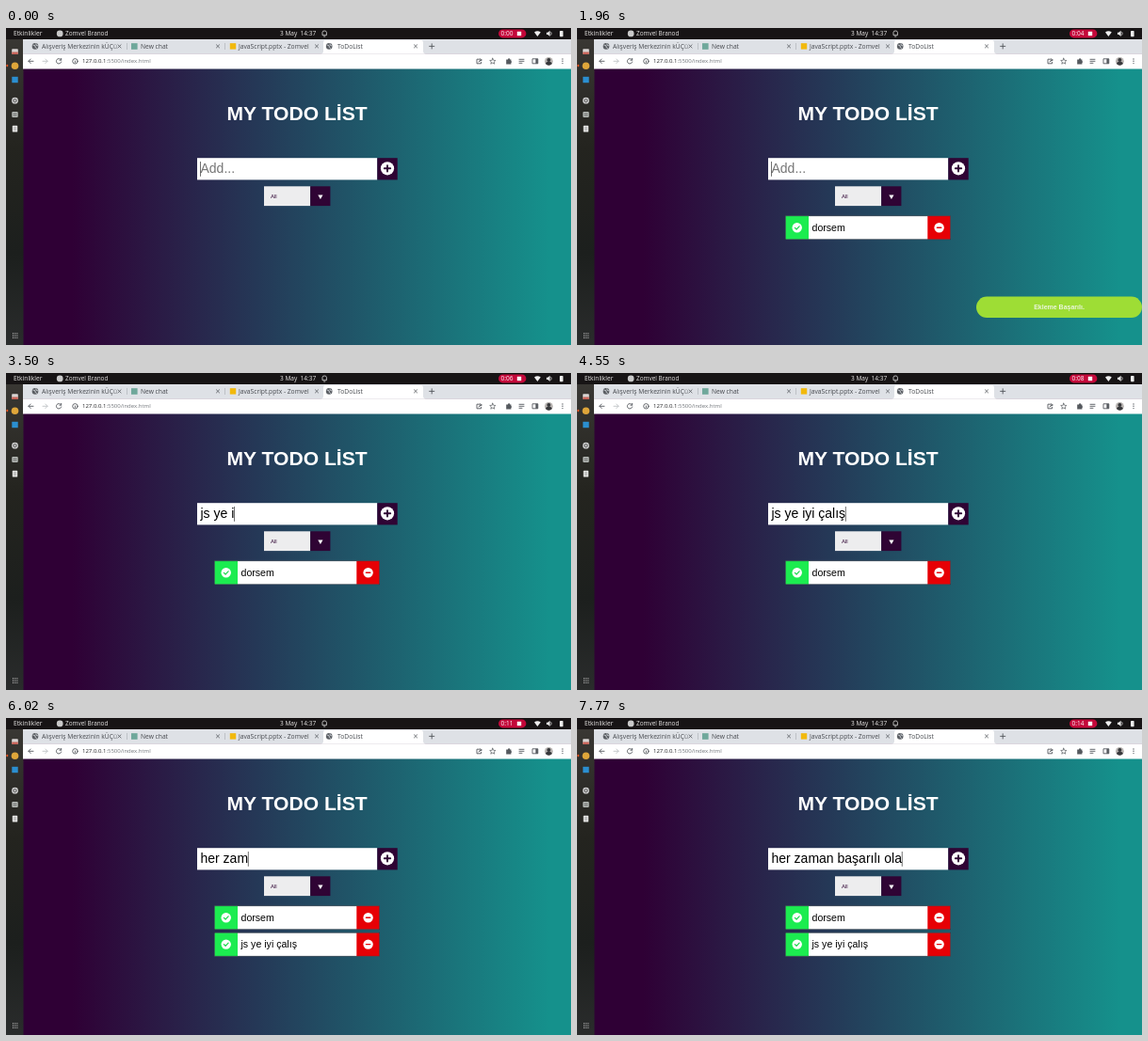
An HTML page that plays this animation: 600x337 px, repeating every 8 s.

```html
<!DOCTYPE html>
<html lang="tr">
<head>
<meta charset="utf-8">
<title>ToDoList</title>
<style>
  html, body { margin: 0; width: 100%; height: 100%; overflow: hidden; background: #2f0036; }
  svg { display: block; width: 100%; height: 100%; }
  text { white-space: pre; font-family: "Liberation Sans", Arial, sans-serif; }
  .ui text { font-family: "Open Sans", "Noto Sans", sans-serif; font-size: 6.7px; }
  .line { fill: none; stroke-linecap: round; stroke-linejoin: round; }
</style>
</head>
<body>
<svg viewBox="0 0 600 337" preserveAspectRatio="none">
  <defs>
    <linearGradient id="page">
      <stop offset=".09" stop-color="#2f0035"/>
      <stop offset=".96" stop-color="#15918c"/>
    </linearGradient>
    <linearGradient id="dockShade" x2="0" y2="1">
      <stop offset="0" stop-color="#393733"/>
      <stop offset=".35" stop-color="#24241f"/>
      <stop offset=".7" stop-color="#1c1f1d"/>
      <stop offset="1" stop-color="#2a2c2c"/>
    </linearGradient>
    <linearGradient id="tabFade" gradientUnits="userSpaceOnUse" x1="38" x2="126">
      <stop offset=".84" stop-color="#45484d"/>
      <stop offset="1" stop-color="#45484d" stop-opacity="0"/>
    </linearGradient>
    <g id="globe">
      <circle r="3.3" fill="#5a5e63"/>
      <path class="line" d="M-2.2-1.3 0-.6 0 1 1.4 2M.8-2.6 1.2-1 2.6-.6" stroke="#dee1e6" stroke-width=".8"/>
    </g>
    <path id="cross" class="line" d="M-1.6-1.6 1.6 1.6M1.6-1.6-1.6 1.6" stroke="#55595e" stroke-width=".8"/>
    <g id="row">
      <rect x="221.3" y="199.8" width="175.4" height="25" fill="#fff"/>
      <rect x="221.3" y="199.8" width="24.7" height="25" fill="#1cec50"/>
      <rect x="372.3" y="199.8" width="24.4" height="25" fill="#e60005"/>
      <rect x="221.3" y="199.8" width="175.4" height="25" fill="none" stroke="#26303c" stroke-width=".6"/>
      <g fill="#fff"><circle cx="233.7" cy="212.2" r="5.2"/><circle cx="384.6" cy="212.2" r="5.2"/></g>
      <path class="line" d="M231.4 212.3 233.1 214 236.1 210.8" stroke="#1cd84c" stroke-width="1.2"/>
      <path class="line" d="M382.4 212.2H386.8" stroke="#e60005" stroke-width="1.4"/>
    </g>
  </defs>

  <rect x="18" y="43" width="582" height="294" fill="url(#page)"/>

  <g class="ui">
    <rect y="12" width="18.5" height="325" fill="url(#dockShade)"/>
    <rect x="6.2" y="22.3" width="6.6" height="5.6" rx=".8" fill="#d8d4d2"/>
    <rect x="6.2" y="25.6" width="6.6" height="2.3" rx=".6" fill="#c8655a"/>
    <circle cx="9.5" cy="40.2" r="3.8" fill="#dfa63a"/>
    <rect x="6.3" y="51.8" width="6.4" height="6.4" fill="#2b8fd0"/>
    <circle cx="9.5" cy="77.2" r="3.4" fill="#cfcfcf"/>
    <circle cx="9.5" cy="77.2" r="1.6" fill="none" stroke="#444" stroke-width=".9"/>
    <rect x="6.3" y="89" width="6.4" height="6" rx="1" fill="#b9bdb9"/>
    <path d="M7.5 91H11.5M7.5 93H11.5" stroke="#444" stroke-width=".7"/>
    <rect x="6.8" y="103.8" width="5.4" height="6.8" rx=".6" fill="#e4e4e2"/>
    <path d="M8 106H11M8 108H11" stroke="#777" stroke-width=".6"/>
    <path d="M7 324.8H12.4M7 327H12.4M7 329.2H12.4" stroke="#d2d2d2" stroke-width="1.1" stroke-dasharray="1.1"/>
    <rect x=".4" y="38.8" width="1.8" height="2.4" rx=".8" fill="#e95420"/>

    <rect width="600" height="12" fill="#171415"/>
    <g fill="#e9e7e6">
      <text x="8" y="8.3">Etkinlikler</text>
      <circle cx="57.2" cy="5.9" r="3.4" fill="#c9c9c9"/>
      <text x="63" y="8.3" style="font-size:6.4px">Zomvel Branod</text>
      <text x="291" y="8.3" style="font-size:6.5px">3 May  14:37</text>
    </g>
    <path class="line" d="M336 7.3V4.6Q336 3 338.2 3T340.4 4.6V7.3ZM337.6 9H338.8" stroke="#ddd" stroke-width=".8"/>
    <rect x="523" y="1.4" width="29.4" height="9" rx="4.5" fill="#c4083a"/>
    <text id="clock" x="525.6" y="8.2" fill="#fff" style="font-size:6.5px">0:00</text>
    <rect x="542.8" y="3.8" width="4.4" height="4.4" fill="#fff"/>
    <g fill="#eee">
      <path d="M561 4.6Q564.4 1.9 567.8 4.6L564.4 9Z"/>
      <path d="M574 4.8H575.4L577.6 2.8V9L575.4 7H574Z"/>
      <rect x="588" y="3" width="3.6" height="6.3" rx=".7"/>
    </g>
    <path class="line" d="M578.8 4.4Q580 5.9 578.8 7.4" stroke="#eee" stroke-width=".7"/>

    <rect x="18" y="12" width="582" height="15.5" fill="#dee1e6"/>
    <path d="M334 27.5Q337 27.5 337 24.5V15.5Q337 13 339.5 13H440.5Q443 13 443 15.5V24.5Q443 27.5 446 27.5Z" fill="#fff"/>
    <path d="M128.5 16V23M232.5 16V23" stroke="#9da1a6" stroke-width=".5"/>
    <use href="#globe" x="31" y="19.4"/>
    <rect x="133" y="16.2" width="6.6" height="6.6" fill="#6fa89b"/>
    <rect x="237.8" y="16.2" width="6.4" height="6.4" fill="#f2b90c"/>
    <use href="#globe" x="343.2" y="19.4"/>
    <g fill="#45484d" style="font-size:6.8px">
      <text x="38" y="21.7" fill="url(#tabFade)">Alışveriş Merkezinin kÜÇü</text>
      <text x="143" y="21.7">New chat</text>
      <text x="247" y="21.7">JavaScript.pptx - Zomvel</text>
      <text x="352" y="21.7">ToDoList</text>
    </g>
    <use href="#cross" x="120.5" y="19.4"/><use href="#cross" x="225" y="19.4"/>
    <use href="#cross" x="330" y="19.4"/><use href="#cross" x="435" y="19.4"/>
    <path class="line" d="M449.6 19.4H454.8M452.2 16.8V22" stroke="#45484d" stroke-width=".8"/>

    <rect x="18" y="27.3" width="582" height="16.2" fill="#fff"/>
    <g class="line" stroke="#55595e" stroke-width=".9">
      <path d="M29 35.3H24M26.2 33 23.9 35.3 26.2 37.6"/>
      <path d="M39 35.3H44M41.8 33 44.1 35.3 41.8 37.6" stroke="#bfc2c6"/>
      <path d="M58.3 33.7A2.7 2.7 0 1 0 58.7 36M58.7 32.4V34.2H56.9"/>
      <circle cx="73.4" cy="35.3" r="2.7"/><path d="M73.4 35V36.6"/>
      <path d="M503.5 33.2H500V37.8H504.6V36.4M502 36Q502.2 34 505 34M504 32.8 505.2 34 504 35.2"/>
      <path d="M516.8 32.2 517.7 34.3 519.9 34.5 518.2 36 518.8 38.2 516.8 37 514.8 38.2 515.4 36 513.7 34.5 515.9 34.3Z" stroke-width=".7"/>
      <path d="M545 33.3H550M545 35.3H550M545 37.3H548"/>
      <rect x="559.4" y="32.8" width="5.4" height="5"/>
    </g>
    <path d="M531.2 33.4H533A1.1 1.1 0 0 1 535.2 33.4H536.4V35A1.1 1.1 0 0 1 536.4 37V38.4H531.2Z" fill="#55595e"/>
    <rect x="562.4" y="32.8" width="2.4" height="5" fill="#55595e"/>
    <circle cx="576.4" cy="35.3" r="4.4" fill="#b9b5b2"/>
    <path d="M573 38.1Q573.4 35.8 576.4 35.8T579.8 38.1Q576.4 41.2 573 38.1Z" fill="#37383b"/>
    <circle cx="576.4" cy="34" r="2" fill="#37383b"/>
    <g fill="#55595e"><circle cx="591" cy="33" r=".7"/><circle cx="591" cy="35.3" r=".7"/><circle cx="591" cy="37.6" r=".7"/></g>
    <text x="81" y="37.4" fill="#202124" style="font-size:6px">127.0.0.1<tspan fill="#72767b">:5500/index.html</tspan></text>
  </g>

  <text x="309" y="98.3" font-size="21.1" font-weight="700" text-anchor="middle" fill="#fff">MY TODO LİST</text>

  <rect x="203" y="138.2" width="191.3" height="23.2" fill="#fff"/>
  <rect x="394.3" y="138.2" width="21.4" height="23.2" fill="#2f0434"/>
  <circle cx="405" cy="149.3" r="7.1" fill="#fff"/>
  <path class="line" d="M401.8 149.3H408.2M405 146.1V152.5" stroke="#2f0434" stroke-width="1.9"/>
  <text id="field" x="206.5" y="154.4" font-size="14"></text>
  <rect id="caret" y="142" width=".7" height="15.8" fill="#333"/>

  <rect x="274" y="168.3" width="49.2" height="20.8" fill="#ededee"/>
  <rect x="323.2" y="168.3" width="21.2" height="20.8" fill="#2f0434"/>
  <text x="281" y="181" font-size="6" fill="#2f0434">All</text>
  <path d="M331.3 177.4H336.5L333.9 182Z" fill="#fff"/>

  <g id="row1"><use href="#row"/><text x="249.5" y="216" font-size="10.6">dorsem</text></g>
  <g id="row2"><use href="#row" y="28.4"/><text x="249.5" y="244.4" font-size="10.6">js ye iyi çalış</text></g>

  <g id="toast">
    <rect x="424" y="285.6" width="176" height="22.4" rx="11.2" fill="#9edd35"/>
    <text x="512" y="299.2" font-size="7" font-weight="700" text-anchor="middle" fill="#eaf5dc">Ekleme Başarılı.</text>
  </g>
</svg>
<script>
const LOOP = 8000;
const $ = id => document.getElementById(id);

// Each entry: the phrase, the time of every keystroke and when it is sent.
const entries = [
  { text: "dorsem", keys: [350, 490, 630, 770, 910, 1050], sent: 1540 },
  { text: "js ye iyi çalış", sent: 4620,
    keys: [2520, 2660, 2800, 2940, 3080, 3220, 3500, 3640, 3780, 3850, 3990, 4130, 4270, 4410, 4480] },
  { text: "her zaman başarılı ola", sent: LOOP,
    keys: [5390, 5460, 5600, 5670, 5810, 5880, 6020, 6160, 6230, 6440, 6510,
           6650, 6790, 6860, 7000, 7140, 7210, 7350, 7490, 7560, 7630, 7700] }
];
const seconds = [210, 770, 1330, 1960, 2240, 3010, 3640, 4270, 4830, 5460, 6020, 6580, 7140, 7700];
const caretOff = [[210, 350], [1400, 1540], [1610, 1960], [2240, 2520], [4900, 5250]];
const toasts = [[1540, 2240], [4620, 5530]];

const passed = (times, t) => times.filter(at => at <= t).length;
const within = (spans, t) => spans.some(([from, to]) => t >= from && t < to);
const show = (id, on) => $(id).setAttribute("visibility", on ? "visible" : "hidden");

function draw(t) {
  const { text, keys } = entries.find(entry => t < entry.sent);
  const typed = text.slice(0, passed(keys, t));
  const field = $("field");
  field.textContent = typed || "Add...";
  field.setAttribute("fill", typed ? "#000" : "#757575");
  $("caret").setAttribute("x", 206.3 + (typed ? field.getComputedTextLength() : 0));
  $("clock").textContent = "0:" + String(passed(seconds, t)).padStart(2, "0");
  show("caret", !within(caretOff, t));
  show("toast", within(toasts, t));
  show("row1", t >= entries[0].sent);
  show("row2", t >= entries[1].sent);
}

function tick(now) {
  draw(now % LOOP);
  requestAnimationFrame(tick);
}
draw(0);
requestAnimationFrame(tick);
</script>
</body>
</html>
```
